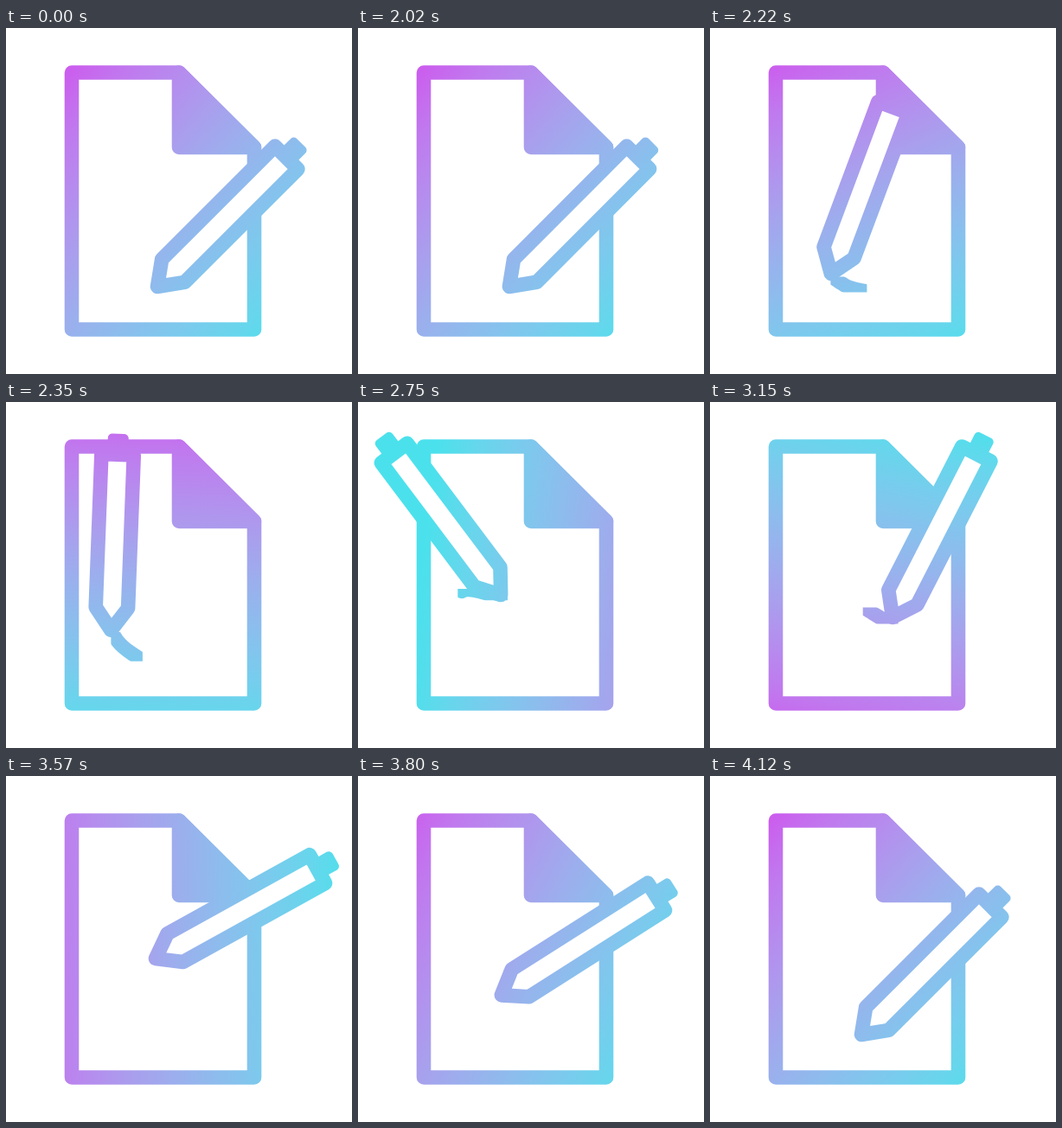
An HTML page with a canvas that plays this animation: 400x400 px, repeating every 4150 ms.

```html
<!DOCTYPE html>
<html lang="en">
<head>
<meta charset="utf-8">
<title>Pen writing on a page</title>
<style>
  html, body { margin: 0; width: 100%; height: 100%; overflow: hidden; background: #fff; }
  canvas { display: block; }
</style>
</head>
<body>
<canvas id="stage" width="400" height="400"></canvas>
<script>
const ctx = document.getElementById('stage').getContext('2d');
const LOOP = 4150, START = 2015, END = 4115, LAG = 200;
const PURPLE = [203, 94, 238], CYAN = [75, 225, 236];

// Key poses of the pen: time, tip x, tip y, tilt in degrees
const POSES = [
  [START, 175, 299, 45],
  [2150, 152, 292, 30],
  [2350, 121.5, 264, 2.3],
  [2550, 117, 214, -26],
  [2750, 165, 223, -37],
  [2950, 177, 234, -8],
  [3150, 211, 249, 27],
  [3370, 210, 203, 44],
  [3570, 173, 211, 61],
  [3850, 166, 262, 56],
  [END, 175, 299, 45]
];

const clamp = u => Math.min(1, Math.max(0, u));
const progress = t => clamp((t - START) / (END - START));
const radians = deg => deg * Math.PI / 180;

// Smooth curve through the poses, at rest on both ends
function pose(t) {
  const last = POSES.length - 1;
  const i = Math.max(0, Math.min(last, POSES.findIndex(p => p[0] > t) - 1));
  if (t <= START) return POSES[0].slice(1);
  if (t >= END) return POSES[last].slice(1);
  const a = POSES[i], b = POSES[i + 1], span = b[0] - a[0];
  const u = (t - a[0]) / span, v = 1 - u;
  const slope = (n, c) => n === 0 || n === last ? 0 :
    (POSES[n + 1][c] - POSES[n - 1][c]) / (POSES[n + 1][0] - POSES[n - 1][0]) * span;
  return [1, 2, 3].map(c =>
    v * v * ((1 + 2 * u) * a[c] + u * slope(i, c)) +
    u * u * ((1 + 2 * v) * b[c] - v * slope(i + 1, c)));
}

function trace(points, closed) {
  ctx.beginPath();
  points.forEach(p => ctx.lineTo(...p));
  if (closed) ctx.closePath();
}

function drawPage() {
  trace([[76, 51.5], [200, 51.5], [287, 138], [287, 348.5], [76, 348.5]], true);
  ctx.stroke();
  trace([[200, 51.5], [200, 138], [287, 138]], true);
  ctx.fill();
  ctx.stroke();
}

// Recent path of the tip, cut to its bounds plus a tenth
function drawInk(t) {
  const lag = Math.min(LAG, (END - t) / 2);
  if (t <= START || lag <= 0) return;
  const from = Math.max(START, t - lag), points = [];
  for (let i = 0; i <= 30; i++) {
    const [x, y] = pose(from + (t - from) * i / 30);
    points.push([x + 3, y + 5]);
  }
  const xs = points.map(p => p[0]), ys = points.map(p => p[1]);
  const x = Math.min(...xs), y = Math.min(...ys);
  const w = Math.max(...xs) - x, h = Math.max(...ys) - y;
  ctx.save();
  ctx.beginPath();
  ctx.rect(x - w / 10, y - h / 10, w * 1.2, h * 1.2);
  ctx.clip();
  trace(points);
  ctx.stroke();
  ctx.restore();
}

function drawPen(t) {
  const [x, y, tilt] = pose(t), s = progress(t), half = 18.7;
  const len = 211 - 11 * Math.sin(2 * Math.PI * s) * (1 - s);
  ctx.save();
  ctx.translate(x, y);
  ctx.rotate(radians(tilt));
  trace([[0, 0], [-half, -26], [-half, -len], [half, -len], [half, -26]], true);
  ctx.globalCompositeOperation = 'destination-out';
  ctx.fill();
  ctx.globalCompositeOperation = 'source-over';
  ctx.stroke();
  ctx.lineWidth = 10;
  ctx.translate(0, -len);
  trace([[-7, -6], [7, -6], [7, -19], [-7, -19]], true);
  ctx.fill();
  ctx.stroke();
  ctx.restore();
}

// Purple to cyan, mixed in linear light
function mix(u) {
  const c = PURPLE.map((p, i) =>
    Math.round((p ** 2.2 * (1 - u) + CYAN[i] ** 2.2 * u) ** (1 / 2.2)));
  return `rgb(${c})`;
}

// The gradient makes one eased turn and sways right while the pen leans left
function shade(t) {
  const e = progress(t) ** 0.8;
  const a = radians(43 + 360 * e * e * (3 - 2 * e));
  const sway = 74 * Math.exp(-(((t - 2750) / 180) ** 2));
  const x = 200 + sway, y = 206, dx = Math.cos(a) * 200, dy = Math.sin(a) * 200;
  const g = ctx.createLinearGradient(x - dx, y - dy, x + dx, y + dy);
  for (let i = 0; i <= 8; i++) g.addColorStop(i / 8, mix(i / 8));
  ctx.save();
  ctx.globalCompositeOperation = 'source-in';
  ctx.fillStyle = g;
  ctx.fillRect(0, 0, 400, 400);
  ctx.restore();
}

function draw(t) {
  ctx.clearRect(0, 0, 400, 400);
  ctx.lineWidth = 16.6;
  ctx.lineJoin = ctx.lineCap = 'round';
  drawPage();
  drawInk(t);
  drawPen(t);
  shade(t);
}

const begin = performance.now();
function frame() {
  draw((performance.now() - begin) % LOOP);
  requestAnimationFrame(frame);
}
frame();
</script>
</body>
</html>
```
